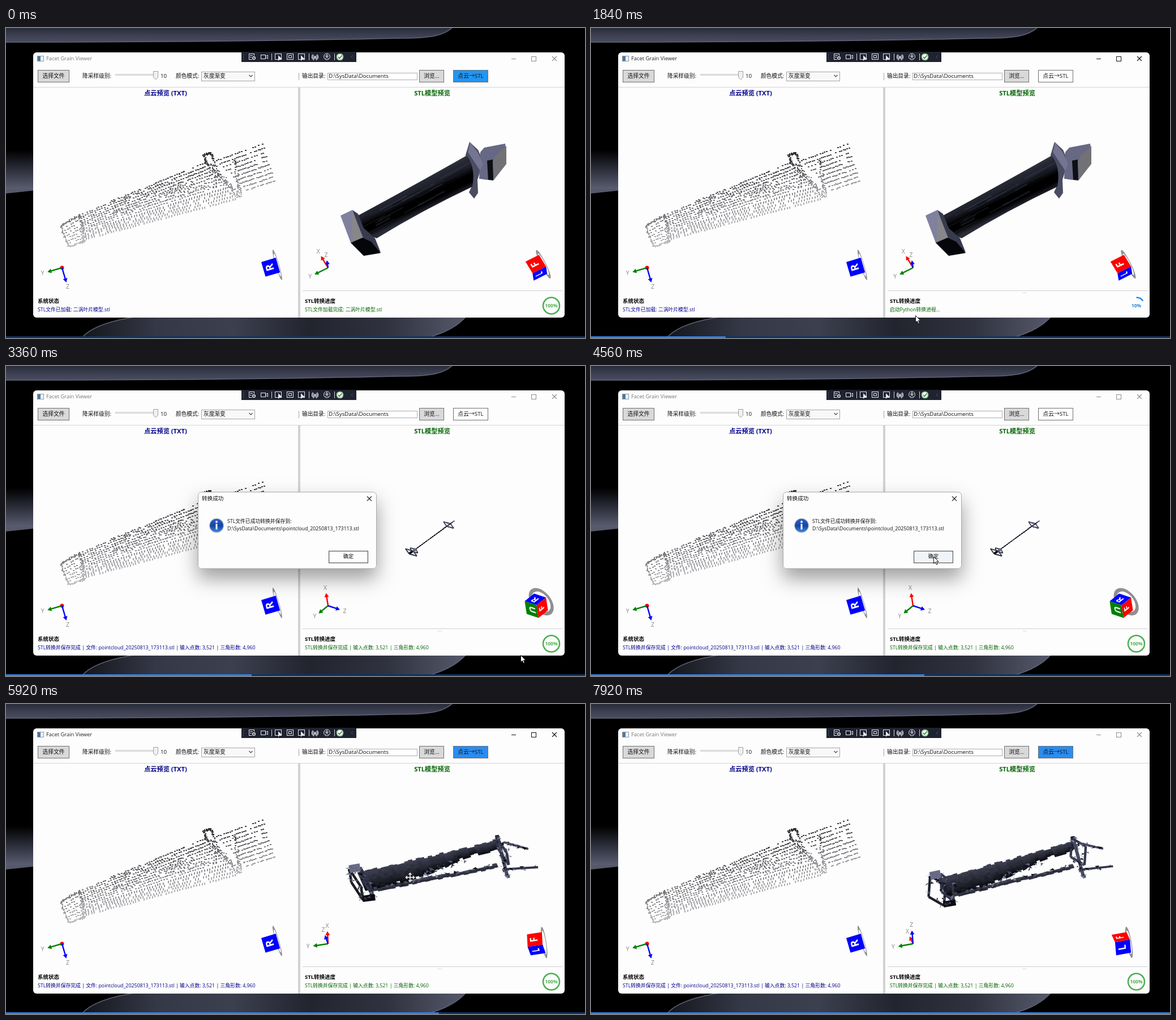
An HTML page with a canvas that plays this animation: 1023 px wide and 547 px high, repeating every 7960 ms.

```html
<!DOCTYPE html>
<html lang="zh">
<head>
<meta charset="utf-8">
<style>
html, body { margin: 0; width: 100%; height: 100%; overflow: hidden; background: #000; }
canvas { display: block; }
</style>
</head>
<body>
<canvas id="stage" width="1023" height="547"></canvas>
<script>
const g = document.getElementById('stage').getContext('2d');
const LOOP = 7960, STEP = 40;
const FONT = '"Open Sans","Noto Sans CJK SC","Noto Sans CJK",sans-serif';
const T = { active: 400, click: 1200, done: 3200, ok: 4840, zoom: 5280, drag: 5600, view: 5920, drop: 7200, blur: 7680 };

const clamp = k => Math.max(0, Math.min(1, k));
const span = (t, a, b) => clamp((t - a) / (b - a));
const smooth = k => k * k * (3 - 2 * k);
const mix = (a, b, k) => Array.isArray(a) ? a.map((v, i) => mix(v, b[i], k)) : a + (b - a) * k;
const dot = (a, b) => a[0] * b[0] + a[1] * b[1] + a[2] * b[2];
const cross = (a, b) => [0, 1, 2].map(i => a[(i + 1) % 3] * b[(i + 2) % 3] - a[(i + 2) % 3] * b[(i + 1) % 3]);
const unit = a => a.map(v => v / Math.hypot(...a));
const seeded = s => () => (s = (s * 16807) % 2147483647) / 2147483647;

function trace(p, close = true) {
  g.beginPath();
  for (let i = 0; i < p.length; i += 2) g.lineTo(p[i], p[i + 1]);
  if (close) g.closePath();
}
function poly(fill, p) { trace(p); g.fillStyle = fill; g.fill(); }
function line(color, w, p, close = false) {
  trace(p, close);
  g.strokeStyle = color; g.lineWidth = w; g.stroke();
}
function rect(x, y, w, h, fill, edge) {
  g.fillStyle = fill; g.fillRect(x, y, w, h);
  if (edge) { g.strokeStyle = edge; g.lineWidth = 1; g.strokeRect(x + .5, y + .5, w - 1, h - 1); }
}
function round(x, y, w, h, r, fill, edge) {
  g.beginPath(); g.roundRect(x, y, w, h, r); g.fillStyle = fill; g.fill();
  if (edge) { g.strokeStyle = edge; g.lineWidth = 1; g.stroke(); }
}
function disc(x, y, r, fill) {
  g.beginPath(); g.arc(x, y, r, 0, 7); g.fillStyle = fill; g.fill();
}
function arc(x, y, r, color, w, from = 0, to = 7) {
  g.beginPath(); g.arc(x, y, r, from, to); g.strokeStyle = color; g.lineWidth = w; g.stroke();
}
function cross2(x, y, r, color) {
  line(color, 1.1, [x - r, y - r, x + r, y + r]);
  line(color, 1.1, [x - r, y + r, x + r, y - r]);
}
function text(s, x, y, size, color = '#111', bold = false, align = 'left') {
  g.font = (bold ? 'bold ' : '') + size + 'px ' + FONT;
  g.textAlign = align; g.textBaseline = 'middle';
  g.fillStyle = color; g.fillText(s, x, y);
}
function shade(x0, y0, x1, y1, ...colors) {
  const q = g.createLinearGradient(x0, y0, x1, y1);
  colors.forEach((c, i) => q.addColorStop(i / (colors.length - 1), c));
  return q;
}

function wave(fill, d) {
  const p = new Path2D(d);
  g.fillStyle = fill; g.fill(p);
  g.strokeStyle = '#5f6276'; g.lineWidth = 1.5; g.stroke(p);
}
function desktop(t) {
  rect(0, 0, 1023, 547, '#000');
  wave(shade(0, 0, 0, 25, '#292c39', '#3c3f50', '#4a4d60'), 'M-4 -4H792C775 14 750 18 700 18C480 23 200 25 -4 25Z');
  rect(0, 215, 48, 70, shade(0, 215, 0, 285, '#000', '#2c2e3a', '#5c5f73'));
  poly('#565969', [0, 284, 48, 284, 48, 287, 0, 292]);
  wave(shade(130, 0, 810, 0, '#14151b', '#353846', '#3c3f4e', '#22242e', '#30323f', '#555869'),
    'M130 552Q150 520 240 508H814C795 530 765 545 715 552Z');
  rect(0, 544, 1023, 3, '#0c3568');
  rect(0, 544, 1023 * t / 7920, 3, '#2f80e6');
}

function toolIcons() {
  const c = '#e8e8ee', bg = '#1f2330';
  rect(416, 42, 203, 18, bg);
  for (let y = 46; y < 57; y += 3) rect(419, y, 1, 1, '#777b8c');
  rect(429, 45, 10, 11, bg, c);
  rect(431, 48, 5, 1, c); rect(431, 51, 3, 1, c);
  disc(438, 53, 4, bg); arc(438, 53, 2.3, c, 1.5);
  rect(450, 47, 9, 8, bg, c);
  line(c, 1, [459, 50, 462.5, 48, 462.5, 54, 459, 52]);
  [469, 535, 580].forEach(x => rect(x, 45, 1, 12, '#d0d0d8'));
  [475, 496, 516].forEach(x => rect(x, 45, 12, 11, bg, c));
  [481, 521].forEach(x => poly(c, [x, 48, x + 7, 55, x + 3, 55, x, 58]));
  rect(499, 48, 6, 5, bg, c);
  disc(546, 51, 1.7, c);
  [3.6, 5.6].forEach(r => { arc(546, 51, r, c, 1.2, -.9, .9); arc(546, 51, r, c, 1.2, 2.24, 4.04); });
  line(c, 1.2, [543, 57, 546, 51, 549, 57]);
  arc(567, 50.5, 5.5, c, 1); disc(567, 47.5, 1.1, c);
  line(c, 1, [563.5, 49.5, 570.5, 49.5]);
  line(c, 1, [564.5, 54.5, 567, 50, 569.5, 54.5]);
  disc(590, 51, 6.3, '#f4f4f4'); arc(590, 51, 5.5, '#55a557', 1);
  line('#2f9138', 1.7, [587, 51, 589.3, 53.5, 593.5, 48.5]);
  line('#4c5061', 1, [613, 48, 610, 51, 613, 54]);
}
function button(x, w, label, fill) {
  rect(x, 74, w, 22, fill, '#707070');
  text(label, x + w / 2, 85, 9.8, '#111', false, 'center');
}
function frame(t, active, busy) {
  round(48, 43, 939, 468, 6, '#fdfdfd');
  rect(55, 49, 12, 10, '#eef2f5', '#8a98a5');
  rect(56, 50, 5, 8, '#51789a');
  const c = active ? '#111' : '#8c8c8c';
  text('Facet Grain Viewer', 71, 54.5, 9.4, active ? '#222' : '#777');
  rect(893, 54, 8, 1, c);
  rect(928, 50, 9, 9, '#fdfdfd', c);
  cross2(969, 54, 4, c);
  toolIcons();

  button(56, 56, '选择文件', '#d9d9d9');
  text('降采样级别:', 135, 85, 9.7);
  rect(193, 81, 72, 3, '#e7eaea', '#d2d2d2');
  const thumb = [260.5, 76.5, 268.5, 76.5, 268.5, 87, 264.5, 91, 260.5, 87];
  poly('#f0f0f0', thumb); line('#a0a0a0', 1, thumb, true);
  text('10', 273, 85.5, 9.7);
  text('颜色模式:', 300, 85, 9.7);
  rect(345, 77, 95, 17, '#f8f8f8', '#a5a5a5');
  text('灰度渐变', 349, 85, 9.7);
  line('#444', 1.1, [429.5, 83, 432.5, 86, 435.5, 83]);
  rect(517, 79, 1, 13, '#a8a8a8');
  text('输出目录:', 523, 85, 9.7);
  rect(568, 79, 159, 13, '#fff', '#abadb3');
  text('D:\\SysData\\Documents', 570, 85.5, 9.8);
  button(730, 44, '浏览...', '#d9d9d9');
  button(790, 62, '点云→STL', busy ? '#fff' : t < T.click ? '#2196f3' : '#2a8cf1');

  rect(48, 104, 939, 1, '#d5d5d5');
  rect(516, 105, 4, 406, '#d2d2d2');
  rect(524, 463, 459, 1, '#d0d0d0');
  if (t >= T.click) rect(762, 467, 8, 1, '#dcdcdc');
  text('点云预览 (TXT)', 282, 116, 11.2, '#00008b', true, 'center');
  text('STL模型预览', 753, 116, 11.2, '#006400', true, 'center');
}

const cloud = [];
(function build() {
  const rnd = seeded(77);
  const put = ([x, y], jitter = 1, w = 2, h = 2) => {
    x += (rnd() - .5) * jitter; y += (rnd() - .5) * jitter;
    const v = Math.round(48 + clamp((x * .25 + y * .97 - 302) / 98) * 140);
    cloud.push([Math.round(x), Math.round(y), w, h, `rgb(${v},${v},${v + 4})`]);
  };
  const strip = (a, b, n, jitter) => { while (n--) put(mix(a, b, rnd()), jitter); };
  // rows and columns inside a quad, with gaps
  const sheet = (a, b, c, d, cols, rows, gap, tall) => {
    for (let j = 0; j <= rows; j++) for (let i = 0; i <= cols; i++) {
      if (rnd() < gap) continue;
      const v = j / rows, low = tall && v > .65;
      put(mix(mix(a, b, i / cols), mix(d, c, i / cols), v), 1, low ? 2 : 3, low ? 4 : 2);
    }
  };
  const loop = (pts, n, jitter) => pts.forEach((p, i) => strip(p, pts[(i + 1) % pts.length], n, jitter));
  sheet([130, 329], [350, 237], [404, 300], [141, 370], 54, 13, .12, true);
  sheet([185, 304], [350, 238], [395, 270], [190, 330], 40, 8, .55);
  sheet([96, 349], [128, 331], [138, 374], [110, 384], 8, 8, .3);
  sheet([371, 233], [452, 204], [473, 269], [424, 285], 24, 9, .22);
  loop([[96, 348], [129, 329], [138, 376], [109, 385]], 34, 3);
  strip([129, 329], [137, 376], 30, 7);
  loop([[348, 223], [361, 220], [370, 243], [353, 238]], 26, 4);
  strip([360, 244], [414, 300], 120, 11);
  strip([402, 232], [414, 298], 50, 6);
})();
function points() {
  for (const [x, y, w, h, c] of cloud) { g.fillStyle = c; g.fillRect(x, y, w, h); }
}

function solidBlade() {
  poly('#4a4c62', [819, 201, 834, 215, 843, 235, 833, 268, 834, 291, 827, 301, 818, 290, 824, 277, 812, 224]);
  poly('#666884', [838, 219, 845, 211, 882, 204, 884, 222, 862, 268, 850, 268, 836, 266]);
  poly('#0e0f15', [850, 234, 860, 232, 861, 269, 852, 268]);
  poly('#717176', [860, 237, 865, 225, 884, 208, 884, 240, 862, 268]);
  poly('#737592', [820, 202, 834, 220, 843, 240, 838, 252, 816, 219]);
  const body = new Path2D('M620 332Q724 276 814 225Q830 246 824 280Q735 322 655 371Q630 364 620 332Z');
  g.save(); g.clip(body);
  rect(600, 200, 240, 180, shade(705, 272, 732, 328, '#3c3f50', '#262833', '#1d1f29', '#000', '#000', '#2a2c39'));
  const rnd = seeded(31);
  for (let i = 0; i < 30; i++) {
    const x = 615 + rnd() * 170, y = 340 - (x - 620) * .53 + rnd() * 34, w = 20 + rnd() * 55;
    line(rnd() < .5 ? 'rgba(70,74,94,.3)' : 'rgba(0,0,0,.4)', 1 + rnd() * 2, [x, y, x + w, y - w * .53]);
  }
  g.restore();
  poly('#383b4d', [612, 321, 622, 328, 632, 353, 652, 371, 662, 396, 629, 371]);
  poly('#7f819f', [591, 331, 612, 321, 631, 371, 609, 379]);
  poly('#87878b', [611, 331, 615, 331, 631, 370, 612, 377]);
  poly('#050609', [609, 379, 630, 370, 645, 377, 662, 397, 632, 402]);
}

// camera: screen right, screen up and the direction to the viewer
function view(r, u) {
  const R = unit(r), k = dot(u, R), U = unit(u.map((v, i) => v - k * R[i]));
  return { R, U, N: cross(R, U) };
}
const blend = (a, b, k) => view(mix(a.R, b.R, k), mix(a.U, b.U, k));
const SIDE = view([3, -24, 7], [0, -9, -24]);
const OLD = view([-12, -23, -2], [17, -11, 11]);
const ISO = view([-4, -19, 24], [26, -15, -9]);
const TURN = view([-1, -24, -5], [19, -3, 13]);
const END = view([-6, -26, -2], [12, -5, 22]);

// broken mesh: u runs along the blade, v and w span its section
const AXES = [[.025, -1, .09], [-.14, -.05, -.16], [.09, .05, -.09]];
const TONES = ['#0b0c11', '#1b1d27', '#33364a', '#4a4c63', '#696b87', '#8688a4'];
function mesh(cam, cx, cy, size) {
  const at = (u, v, w = 0) => {
    const p = [0, 1, 2].map(i => (u - .5) * AXES[0][i] + (v - .5) * AXES[1][i] + w * AXES[2][i]);
    return [cx + size * dot(cam.R, p), cy - size * dot(cam.U, p)];
  };
  const rnd = seeded(19), wob = r => (rnd() - .5) * 2 * r;
  const shards = (a, b, n, spread, r = .018) => {
    while (n--) {
      const [u, v, w] = mix(a, b, rnd()), du = wob(spread), dv = wob(spread * 3);
      const tip = () => at(u + du + wob(r), v + dv + wob(r * 4), w + wob(r * 4));
      poly(TONES[Math.floor(rnd() * 6)], [...tip(), ...tip(), ...tip()]);
    }
  };
  const beam = (a, b, w, tone, n) => {
    line(TONES[tone], w * size, [...at(...a), ...at(...b)]);
    shards(a, b, n, .013);
  };
  const loop = (u, top, low, wide, tone, n) => {
    const mid = (top + low) / 2, p = [[u, top, 0], [u, mid, wide], [u, low, 0], [u, mid, -wide]];
    p.forEach((a, i) => beam(a, p[(i + 1) % 4], .016, tone, n));
  };
  // one skin of small facets, dropped past a ragged lower edge
  const skin = (u0, u1, cols, rows, top, low, rough, tone) => {
    for (let i = 0; i < cols; i++) {
      const a = mix(u0, u1, i / cols), b = mix(u0, u1, (i + 1) / cols), cut = wob(rough), lip = wob(.03);
      for (let j = 0; j < rows; j++) {
        const edge = (u, k) => mix(top(u) + (k ? 0 : lip), low(u) + cut, k);
        const k0 = j / rows, k1 = (j + 1) / rows, c = tone(k0) + wob(5);
        const q = [...at(a, edge(a, k0)), ...at(b, edge(b, k0)), ...at(b, edge(b, k1)), ...at(a, edge(a, k1))];
        const fill = `rgb(${c},${c + 2},${c * 1.25 + 4})`;
        poly(fill, q); line(fill, .8, q, true);
      }
    }
  };
  g.save();
  g.lineJoin = 'round';
  const rail = u => .7 + .17 * u;
  skin(.06, .9, 30, 2, rail, u => rail(u) + .11, .02, k => 58 - 30 * k);
  skin(.04, .97, 36, 8, () => .17, u => mix(.72, .42, smooth(span(u, .36, .8))), .05, k => 58 * (1 - k) ** .7);
  shards([.4, .7, 0], [.72, .48, 0], 40, .03);
  shards([.15, .74, 0], [.9, .88, 0], 28, .012);
  loop(0, 0, 1, .9, 1, 8);
  loop(.07, .02, .96, .6, 2, 9);
  beam([0, 0, 0], [.07, .02, 0], .05, 4, 4);
  beam([0, .96, 0], [.08, 1, 0], .04, 0, 8);
  beam([.98, 0, 0], [.93, 1.3, 0], .022, 3, 30);
  loop(.97, .05, .95, .8, 2, 8);
  beam([1, .25, 0], [1.13, .62, 0], .014, 3, 18);
  beam([.93, 1.05, 0], [1.14, 1.22, 0], .014, 2, 18);
  g.restore();
}

const HUES = ['#00f', '#008000', '#f00'], LETTERS = ['RL', 'UD', 'FB'];
function cube(cx, cy, { R, U, N }, h = 13.5) {
  g.save();
  g.transform(R[0], -U[0], R[2], -U[2], cx - 14 * R[1], cy + 14 * U[1]);
  g.beginPath(); g.arc(0, 0, 28, 0, 7); g.closePath(); g.moveTo(21, 0); g.arc(0, 0, 21, 0, 7);
  g.fillStyle = '#909090'; g.fill('evenodd');
  g.restore();
  N.forEach((n, i) => {
    if (Math.abs(n) < .25) return;
    const s = Math.sign(n), axis = k => [0, 1, 2].map(j => +(j === k));
    const out = axis(i).map(v => v * s), up = axis(i === 1 ? 2 : 1), right = cross(up, out);
    g.save();
    g.transform(dot(R, right), -dot(U, right), -dot(R, up), dot(U, up), cx + h * dot(R, out), cy - h * dot(U, out));
    rect(-h, -h, 2 * h, 2 * h, HUES[i]);
    text(LETTERS[i][s > 0 ? 0 : 1], 0, 0, 19, '#fff', true, 'center');
    g.restore();
  });
}
function axes(x, y, { R, U }) {
  [['#f00', 'X'], ['#008000', 'Y'], ['#00f', 'Z']].forEach(([c, name], i) => {
    const dx = 27 * R[i], dy = -27 * U[i], d = Math.hypot(dx, dy), ux = dx / d, uy = dy / d;
    if (d < 4) return disc(x, y, 3.5, c);
    text(name, x + dx + ux * 9, y + dy + uy * 9, 10.5, '#888', false, 'center');
    line(c, 2.4, [x, y, x + dx * .85, y + dy * .85]);
    const bx = x + dx - ux * 7, by = y + dy - uy * 7;
    poly(c, [x + dx, y + dy, bx - uy * 4, by + ux * 4, bx + uy * 4, by - ux * 4]);
  });
}
function model(t) {
  let cam = OLD;
  if (t < T.done) solidBlade();
  else {
    const turn = smooth(span(t, T.drag, T.view)), tilt = smooth(span(t, T.view, T.drop));
    const zoom = t < T.zoom ? 100 : Math.min(278, 120 * 1.23 ** Math.floor((t - T.zoom) / 80));
    cam = blend(blend(ISO, TURN, turn), END, tilt);
    const [x, y] = mix(mix([750, 304], [752, 288], turn), [740, 294], tilt);
    mesh(cam, x, y, zoom - 10 * tilt);
  }
  axes(569, 423, cam);
  cube(937, 423, cam);
}

function status(busy, done) {
  const saved = 'STL转换并保存完成 | ', counts = '输入点数: 3,521 | 三角形数: 4,960', file = '二涡叶片模型.stl';
  text('系统状态', 56, 483, 9.5, '#000', true);
  text(done ? saved + '文件: pointcloud_20250813_173113.stl | ' + counts : 'STL文件已加载: ' + file, 56, 498, 8.8, '#00008b');
  text('STL转换进度', 528, 483, 9.5, '#000', true);
  text(done ? saved + counts : busy ? '启动Python转换进程...' : 'STL文件加载完成: ' + file, 528, 498, 8.8, '#006400');
  const part = busy && !done, c = part ? '#2188e8' : '#4caf50', top = -Math.PI / 2;
  arc(963.5, 490, 14.5, c, 2.5, top, top + Math.PI * (part ? .3 : 2));
  text(part ? '10%' : '100%', 963.5, 490.5, 8.4, c, true, 'center');
}

function dialog(t) {
  const a = span(t, T.done - STEP, T.done + 120) * (1 - span(t, T.ok - STEP, T.ok + 80));
  if (a <= 0) return;
  g.save();
  g.globalAlpha = a;
  g.shadowColor = 'rgba(0,0,0,.38)'; g.shadowBlur = 34; g.shadowOffsetY = 17;
  round(339, 222, 316, 136, 6, '#fdfdfd');
  g.shadowColor = 'transparent';
  round(339.5, 222.5, 315, 135, 6, '#fdfdfd', '#a9a9a9');
  text('转换成功', 346, 234, 9.6);
  cross2(642, 234, 4, '#222');
  disc(372, 281.5, 13, '#bcc3cc');
  disc(372, 281.5, 11.8, shade(0, 270, 0, 294, '#2b61c9', '#1744a1', '#3f8bea'));
  disc(372, 275, 1.9, '#fff'); rect(370.5, 278.5, 3, 10, '#fff');
  text('STL文件已成功转换并保存到:', 391, 275, 8.8);
  text('D:\\SysData\\Documents\\pointcloud_20250813_173113.stl', 391, 288, 8.8);
  rect(570, 326, 70, 22, '#ddd', '#555');
  rect(572, 328, 66, 18, t >= 3960 ? '#f0f4f8' : '#fdfdfd');
  text('确定', 605, 336.5, 9.2, '#111', false, 'center');
  g.restore();
}

// stops: arrive, leave, x, y
const STOPS = [[0, 400, 700, 550], [960, 1360, 820, 86], [1800, 1840, 573, 507], [2505, 3400, 909, 510], [3960, 4840, 605, 336],
  [5200, 5480, 830, 352], [5920, 5920, 714, 306], [7200, 7200, 704, 338], [7600, LOOP, 720, 555]];
function cursor(t) {
  const i = STOPS.findLastIndex(s => s[0] <= t), a = STOPS[i], b = STOPS[i + 1] || a;
  const [x, y] = mix(a.slice(2), b.slice(2), t > a[1] ? span(t, a[1], b[0]) : 0);
  g.save(); g.translate(Math.round(x), Math.round(y));
  if (t >= T.drag && t < T.drop) {
    for (const [c, w] of [['#222', 3], ['#fff', 1.5]]) for (let k = 0; k < 4; k++) {
      g.rotate(Math.PI / 2);
      line(c, w, [0, 0, 7, 0]); line(c, w, [5, -2.5, 7.5, 0, 5, 2.5]);
    }
  } else {
    const p = [.5, .5, .5, 12.5, 3.3, 10, 5.3, 14.5, 7.3, 13.6, 5.4, 9.2, 9.2, 9.2];
    poly('#fff', p); line('#111', 1, p, true);
  }
  g.restore();
}

function draw(t) {
  const done = t >= T.done, busy = t >= T.click && t < T.ok;
  const active = t >= T.active && t < T.done || t >= T.ok && t < T.blur;
  desktop(t);
  frame(t, active, busy);
  points();
  axes(99, 423, SIDE);
  cube(466, 422, SIDE);
  model(t);
  status(busy, done);
  dialog(t);
  cursor(t);
}

let shown = -1;
const start = performance.now();
function tick() {
  const t = Math.floor(((performance.now() - start) % LOOP) / STEP) * STEP;
  if (t !== shown) draw(shown = t);
  requestAnimationFrame(tick);
}
tick();
</script>
</body>
</html>
```
